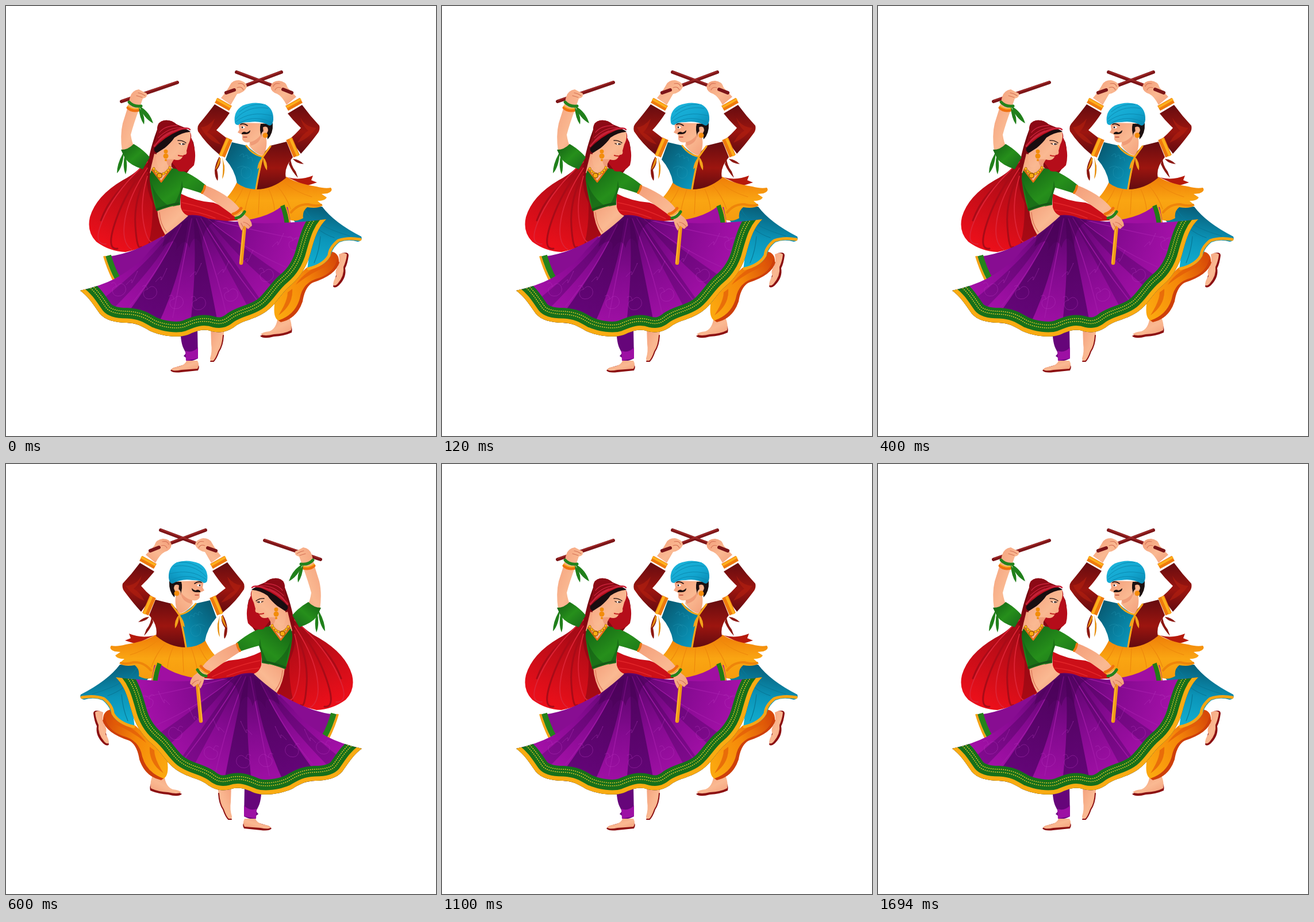
These frames come from a looping animation (748 by 748 pixels, 2.09 s). An HTML page:

```html
<!DOCTYPE html>
<html lang="en">
<head>
<meta charset="utf-8">
<title>Stick dance</title>
<style>
  html, body { margin: 0; width: 100%; height: 100%; overflow: hidden; background: #fff; }
  svg { display: block; width: 100vw; height: 100vh; }
  .line { fill: none; stroke-linecap: round; stroke-linejoin: round; }
  .skin { fill: url(#skin); }
  .stick { stroke: #7c1518; stroke-width: 6; }
  .shine { stroke: #a52a28; stroke-width: 1.5; }
  .sole { fill: #8c1012; }
  .motif { fill: none; stroke: #b73abd; stroke-width: 1; opacity: .4; }
</style>
</head>
<body>
<svg viewBox="0 0 748 748" xmlns="http://www.w3.org/2000/svg">
  <defs>
    <linearGradient id="skin" x1="0" y1="0" x2="1" y2="1">
      <stop offset="0" stop-color="#f39d79"/><stop offset=".55" stop-color="#fab992"/><stop offset="1" stop-color="#f3a07a"/>
    </linearGradient>
    <linearGradient id="maroon" x1="0" y1="0" x2="0" y2="1">
      <stop offset="0" stop-color="#650c10"/><stop offset=".55" stop-color="#9c150f"/><stop offset="1" stop-color="#620b10"/>
    </linearGradient>
    <linearGradient id="teal" x1="0" y1="0" x2="1" y2="1">
      <stop offset="0" stop-color="#075269"/><stop offset=".5" stop-color="#087a99"/><stop offset="1" stop-color="#0aa0c6"/>
    </linearGradient>
    <linearGradient id="dhoti" x1=".6" y1="0" x2=".4" y2="1">
      <stop offset="0" stop-color="#075a74"/><stop offset=".5" stop-color="#0b94b8"/><stop offset="1" stop-color="#12b0d2"/>
    </linearGradient>
    <linearGradient id="turban" x1="0" y1="0" x2="1" y2="1">
      <stop offset="0" stop-color="#1cb6dc"/><stop offset=".6" stop-color="#13a6d0"/><stop offset="1" stop-color="#0889b2"/>
    </linearGradient>
    <linearGradient id="amber" x1="0" y1="0" x2="0" y2="1">
      <stop offset="0" stop-color="#ef7d08"/><stop offset=".5" stop-color="#faa512"/><stop offset="1" stop-color="#f59a0e"/>
    </linearGradient>
    <linearGradient id="pants" x1="0" y1=".7" x2="1" y2=".2">
      <stop offset="0" stop-color="#fba70f"/><stop offset=".5" stop-color="#f58809"/><stop offset="1" stop-color="#d74908"/>
    </linearGradient>
    <linearGradient id="green" x1="0" y1="0" x2="1" y2="1">
      <stop offset="0" stop-color="#125f14"/><stop offset=".5" stop-color="#268f1b"/><stop offset="1" stop-color="#17661a"/>
    </linearGradient>
    <linearGradient id="cape" gradientUnits="userSpaceOnUse" x1="262" y1="245" x2="185" y2="415">
      <stop offset="0" stop-color="#770711"/><stop offset=".45" stop-color="#b80c17"/><stop offset="1" stop-color="#ea0f1a"/>
    </linearGradient>
    <radialGradient id="purple" gradientUnits="userSpaceOnUse" cx="318" cy="370" r="225">
      <stop offset="0" stop-color="#560467"/><stop offset=".45" stop-color="#840a90"/><stop offset="1" stop-color="#ac12ae"/>
    </radialGradient>
    <radialGradient id="fold" gradientUnits="userSpaceOnUse" cx="318" cy="370" r="200">
      <stop offset="0" stop-color="#4c035b"/><stop offset="1" stop-color="#66057a"/>
    </radialGradient>
    <path id="hem" d="M557 371C540 388 536 408 530 428C524 452 512 472 494 487C478 500 468 522 450 533C430 546 415 546 400 556C385 568 372 569 358 566C342 560 330 566 316 572C298 578 270 574 250 565C235 556 228 552 210 551C190 551 172 546 163 535C152 520 146 508 129 495"/>
    <clipPath id="inSkirt"><path id="skirtShape"/></clipPath>
    <path id="paisley" class="motif" d="M-13 -9Q-6 -15 -4 -4Q4 -14 11 -5Q16 6 4 12Q-9 15 -11 4Q-12 -3 -4 -4"/>
    <path id="squiggle" class="motif" d="M-10 10Q2 -4 0 4T5 -3T9 -12"/>
    <g id="cuff">
      <path class="line" style="stroke-linecap:butt" d="M-12.5 -7L12.5 7" stroke="#ef7a0e" stroke-width="10"/>
      <path class="line" style="stroke-linecap:butt" d="M-12 -9L13 5" stroke="#fcb01c" stroke-width="4"/>
    </g>
  </defs>
  <rect width="748" height="748" fill="#fff"/>
  <g id="dancers">
    <g id="man">
      <!-- feet and trousers -->
      <path class="sole" d="M584 430Q596 427 596 434Q594 449 590 456Q593 472 579 486Q572 492 569 488Z"/>
      <path class="skin" d="M579 432Q588 427 593 432Q592 443 587 454Q589 469 577 483Q571 489 569 484Q570 476 575 470Q572 463 575 457Q582 447 579 432Z"/>
      <path class="sole" d="M494 553Q499 560 497 568Q484 574 466 575Q448 580 442 574L450 570Z"/>
      <path class="skin" d="M472 546L494 544Q498 556 496 564Q485 570 466 571Q450 575 443 571Q447 567 458 566Q469 562 472 546Z"/>
      <path fill="url(#pants)" d="M465 510L522 456L566 427Q580 430 579 446Q572 468 532 480Q519 488 515 514Q505 543 478 549Q464 546 467 520Z"/>
      <path fill="#ce3f0a" d="M576 440Q572 463 545 473Q516 480 511 509Q503 537 474 547L478 550Q506 544 516 514Q520 488 534 481Q574 468 580 446Z"/>
      <path fill="#e35a08" opacity=".7" d="M560 452Q530 464 504 485Q521 458 563 445ZM498 492Q500 520 474 538Q490 513 490 498Z"/>
      <!-- draped cloth -->
      <path fill="url(#dhoti)" d="M490 360L522 350L550 349Q571 377 618 401Q621 408 612 410Q595 405 580 411Q570 419 566 430Q560 452 524 459L530 410Z"/>
      <path class="line" stroke="#f9a514" stroke-width="5" d="M616 406Q595 402 578 408Q563 420 562 434Q552 451 526 457"/>
      <path class="line" stroke="#087897" stroke-width="1.2" d="M521 355Q535 382 598 400M519 362Q540 393 571 403M547 401Q545 426 536 447"/>
      <!-- flared tunic -->
      <path fill="#b51a0c" d="M490 298Q512 304 534 295L531 303L541 307L522 313Z"/>
      <path fill="url(#amber)" d="M402 306Q444 324 488 297Q506 309 540 314Q555 318 565 316Q570 322 559 326L549 327L558 333Q555 339 542 339L551 347Q542 353 524 350Q515 357 517 369Q505 376 493 372L440 380Q403 368 371 344Q389 333 402 306Z"/>
      <path class="line" stroke="#ee890c" stroke-width="1.2" d="M413 315Q403 338 393 347M426 319Q418 341 415 360M441 320L439 362M457 318Q466 338 467 354M471 312Q487 330 495 353M482 305Q502 323 532 332"/>
      <path class="line" stroke="#ee850a" stroke-width="4" d="M496 359Q508 344 526 345Q541 349 548 346"/>
      <!-- torso -->
      <path fill="url(#teal)" d="M393 237L419 243Q435 258 447 262L435 319Q414 318 402 308Q398 285 382 267Z"/>
      <path fill="url(#maroon)" d="M446 258L460 243L488 236L499 263Q483 281 487 299Q463 319 435 319L447 262Z"/>
      <g class="motif" style="stroke:#2a9cb7"><path d="M406 261q9-9 7 2q9-9 8 3q8-8 8 4M410 295q-4-16 9-15q12 4 6 16q-8 8-15-1M402 282q12-8 17 2"/></g>
      <!-- head -->
      <path class="skin" d="M404 203L406 215L403 220L411 224L411 232Q414 239 424 237L423 243Q434 258 447 260Q455 249 453 231L449 204Z"/>
      <path fill="#e88968" opacity=".6" d="M424 237Q437 234 444 223Q443 239 426 243Z"/>
      <path fill="#1d1010" d="M443 205L464 204Q465 222 455 232Q454 220 449 217Q442 220 445 229Q440 215 443 205Z"/>
      <path class="skin" d="M447 211Q455 207 456 216Q454 225 448 222Z"/>
      <circle cx="451" cy="225" r="4.5" fill="#f68c0b"/>
      <path class="line" stroke="#251111" stroke-width="1.6" d="M408 206Q413 203 420 208"/>
      <ellipse cx="412" cy="211" rx="3.5" ry="2" fill="#fff"/><circle cx="411" cy="211" r="1.5" fill="#211"/>
      <path fill="#1d1010" d="M410 221Q414 217 418 220Q422 219 425 216Q425 223 417 223L410 223Z"/>
      <path class="line" stroke="#bd4837" stroke-width="1.5" d="M413 228L419 228"/>
      <path fill="url(#turban)" d="M398 203Q395 183 412 173Q432 165 451 171Q466 179 465 198Q464 208 458 208Q443 199 424 202Q409 202 404 207Q399 207 398 203Z"/>
      <path class="line" stroke="#0c8bb2" stroke-width="1" d="M400 196Q422 172 456 178M400 201Q426 181 463 191M407 203Q433 188 463 203M406 184Q424 169 447 171"/>
      <!-- trim and tie -->
      <path class="line" stroke="#f8a51a" stroke-width="3" d="M418 243Q429 259 447 262L460 244M446 264Q440 287 435 318"/>
      <path fill="#f4a31b" d="M447 262Q456 272 454 286Q447 278 447 262ZM446 263Q446 279 437 284Q438 272 446 263Z"/>
      <!-- sticks and arms -->
      <path class="line stick" d="M401 115L497 151M479 115L383 151"/>
      <path class="line shine" d="M402 114L497 149M478 114L416 137"/>
      <path class="skin" d="M390 137Q394 129 405 129Q419 132 419 141Q414 151 402 153L391 172L374 160Q384 148 390 137Z"/>
      <path class="skin" d="M460 140Q463 130 475 130Q487 131 490 142L505 158L488 172Q480 157 472 153Q461 150 460 140Z"/>
      <path class="line" stroke="#d8775a" stroke-width="1.2" d="M404 135Q413 133 415 140M402 142Q410 139 413 146M476 135Q467 133 465 140M478 142Q471 140 468 146"/>
      <path class="line stick" d="M482 145L497 151M397 146L383 151"/>
      <path fill="url(#maroon)" d="M363 171L389 186Q378 203 366 216L388 233L372 259Q350 242 334 218Q332 210 336 205Q351 187 363 171Z"/>
      <path fill="url(#maroon)" d="M490 187L515 172Q529 191 545 208Q547 216 541 223Q526 243 513 257L494 231Q505 222 513 212Q500 200 490 187Z"/>
      <path fill="#b52010" opacity=".6" d="M339 211Q352 210 363 196Q359 211 350 220Q361 225 374 241Q352 236 339 211ZM540 212Q521 211 512 194Q515 208 526 217Q515 223 507 238Q526 231 540 212Z"/>
      <use href="#cuff" transform="translate(378 171)"/>
      <use href="#cuff" transform="matrix(-1 0 0 1 501 171)"/>
      <use href="#cuff" transform="translate(382 246) rotate(-96) scale(1.15)"/>
      <use href="#cuff" transform="matrix(-1 0 0 1 499 246) rotate(-96) scale(1.15)"/>
      <path fill="#8c1710" d="M371 262Q377 271 367 285Q370 299 368 304Q363 298 363 286Q364 274 371 262ZM495 263Q495 277 504 288L508 299Q498 289 492 275ZM499 266Q509 266 518 275Q505 274 499 266Z"/>
      <path fill="#e7900e" d="M376 263Q379 280 376 301Q381 293 380 278ZM371 264L364 285Q371 279 374 265Z"/>
    </g>
    <g id="woman">
      <!-- rear fabric -->
      <path fill="#cc0f18" d="M303 326Q330 340 361 342Q389 352 404 373L350 376L304 365Z"/>
      <path class="line" stroke="#e3262a" stroke-width="1.5" d="M306 342Q344 349 389 370M308 355Q335 357 364 369"/>
      <path fill="#a00fa2" d="M390 376Q453 371 480 348L490 350L496 381Q440 387 390 382Z"/>
      <path class="line" stroke="#217b16" stroke-width="8" style="stroke-linecap:butt" d="M481 347Q487 362 489 381"/>
      <path class="line" stroke="#f4a315" stroke-width="2" style="stroke-linecap:butt" d="M486 347Q492 362 494 381"/>
      <path fill="url(#cape)" d="M264 212Q254 238 249 262Q234 287 203 303Q157 330 146 367Q140 393 157 410Q180 427 208 428Q250 419 284 394L265 356L252 301L282 270Q292 293 315 290Q334 268 326 237L313 212Z"/>
      <path fill="#7b0711" opacity=".5" d="M249 265Q238 307 255 343Q256 382 248 413L276 398L262 354L251 302L259 280Z"/>
      <path class="line" stroke="#a90b17" stroke-width="3" d="M237 286Q183 323 165 373M246 290Q222 337 225 382T235 419M243 281Q209 321 191 373T194 422"/>
      <path class="line" stroke="#dd2335" stroke-width="1.8" d="M246 271Q194 317 171 366T174 414M246 282Q214 330 207 371T219 424M246 296Q233 341 239 376T255 411"/>
      <!-- legs -->
      <path class="skin" d="M356 556L380 556Q378 590 370 600Q366 612 361 618Q355 620 355 613Q359 601 357 588Z"/>
      <path class="line" stroke="#8c1012" stroke-width="2" d="M378 573Q377 591 370 601Q366 613 361 618L356 618"/>
      <path fill="url(#fold)" d="M303 560L333 560L334 613Q323 619 313 617L315 613L309 609L313 604L309 596Q304 587 303 560Z"/>
      <path fill="#9d10a4" d="M312 600Q325 604 334 594L334 613L313 617Z"/>
      <path class="sole" d="M330 618Q339 627 334 634L305 637Q290 639 286 634L290 630Z"/>
      <path class="skin" d="M314 617L333 617Q337 624 333 631L305 633Q291 636 287 632Q291 628 301 627Q312 624 314 617Z"/>
      <!-- skirt -->
      <path fill="#880d92" d="M172 436Q215 434 272 400L290 470L192 480Z"/>
      <path class="line" stroke="#24831b" stroke-width="10" style="stroke-linecap:butt" d="M178 434Q184 456 194 474"/>
      <path class="line" stroke="#f4a315" stroke-width="4" style="stroke-linecap:butt" d="M171 435Q177 456 187 476"/>
      <g clip-path="url(#inSkirt)">
        <path fill="url(#purple)" d="M120 350H570V590H120Z"/>
        <path fill="url(#fold)" d="M306 376Q282 440 200 550L262 560Q307 465 317 372ZM326 370Q333 450 320 560L370 560Q350 454 331 369Z"/>
        <path fill="url(#fold)" opacity=".55" d="M336 368Q376 439 432 545L456 530Q385 428 342 367ZM350 369Q398 434 478 500L496 478Q407 420 354 369ZM284 396Q246 450 155 520L178 535Q266 449 296 386Z"/>
        <path class="line" stroke="#a31ba9" stroke-width="1.6" opacity=".8" d="M323 370Q306 459 290 542M331 370Q363 447 383 535M339 369Q387 449 441 517M352 371Q407 419 486 454M305 380Q264 465 215 522M364 373Q431 391 516 407"/>
        <path fill="#4a0359" opacity=".5" d="M277 398L317 364L372 373Q342 377 341 419Q328 389 319 421Q312 398 296 425Q301 397 272 419Z"/>
        <use href="#paisley" x="453" y="467"/><use href="#paisley" x="503" y="412"/><use href="#paisley" x="391" y="501"/>
        <use href="#paisley" x="335" y="516"/><use href="#paisley" x="296" y="514"/><use href="#paisley" x="250" y="497"/><use href="#paisley" x="196" y="492"/>
        <use href="#squiggle" x="330" y="461"/><use href="#squiggle" x="378" y="457"/><use href="#squiggle" x="420" y="438"/>
        <use href="#squiggle" x="473" y="409"/><use href="#squiggle" x="270" y="470"/><use href="#squiggle" x="219" y="475"/>
        <use href="#hem" fill="none" stroke="#17701a" stroke-width="52"/>
        <use href="#hem" fill="none" stroke="#f9ab12" stroke-width="15"/>
        <g id="stitches" class="line" stroke="#e0c52b" stroke-width="1.8" stroke-dasharray=".2 3.4"></g>
      </g>
      <!-- raised arm -->
      <path class="line stick" d="M201 166L298 133"/><path class="line shine" d="M202 164L298 131"/>
      <path class="skin" d="M216 158Q219 147 231 145Q238 149 245 152Q247 159 238 161L232 178Q222 205 217 224Q219 238 224 247L202 253Q198 225 203 204Q211 181 216 158Z"/>
      <path class="line" stroke="#d57457" stroke-width="1.2" d="M230 151Q236 152 242 156M227 156L237 159"/>
      <path class="line" stroke="#ef7110" stroke-width="5" d="M212 177Q219 184 231 181"/>
      <path class="line" stroke="#f8b11e" stroke-width="2" d="M212 174Q221 181 232 178"/>
      <path class="line" stroke="#22831c" stroke-width="5" d="M214 167Q222 176 235 174"/>
      <path fill="#20801b" d="M232 174Q250 184 256 204Q239 195 232 174ZM231 176Q243 190 240 206Q232 195 231 176ZM205 255Q203 281 193 291Q193 275 203 257ZM207 257Q213 278 208 293Q202 279 207 257Z"/>
      <path fill="url(#green)" d="M200 250Q213 250 222 240Q238 249 250 263L238 284Q216 277 207 265Z"/>
      <!-- body -->
      <path class="skin" d="M258 257L287 265L288 286L269 307L250 290Z"/>
      <path class="skin" d="M263 354L303 343Q304 360 317 365Q299 382 277 398Q265 379 263 354Z"/>
      <path class="line" stroke="#df795c" stroke-width="1.4" d="M267 359Q268 379 279 393"/>
      <path fill="url(#green)" d="M250 303Q249 291 255 283L270 307L287 282Q314 284 348 312L341 326Q320 319 308 316Q302 331 303 346Q280 349 262 357Q253 330 250 303Z"/>
      <path fill="#115415" opacity=".5" d="M308 316Q302 332 303 346L290 349Q304 328 306 304ZM252 305Q260 332 285 349L262 357Z"/>
      <path class="line" stroke="#e86b11" stroke-width="2.5" d="M254 285L270 306L287 283"/>
      <path class="line" stroke="#165717" stroke-width="3" d="M262 354Q282 346 301 343"/>
      <!-- lowered arm -->
      <path class="line" stroke="#f19a16" stroke-width="6.5" d="M415 382L409 447"/>
      <path class="line" stroke="#ffc03a" stroke-width="1.5" d="M413 389L407 447"/>
      <path class="skin" d="M347 312Q383 326 402 347L416 364Q427 371 428 382L421 388L414 382L410 391Q403 380 403 370Q373 347 340 326Z"/>
      <path class="line" stroke="#d57457" stroke-width="1.2" d="M413 376Q420 377 425 384M409 378L414 387"/>
      <path class="line" stroke="#ed7610" stroke-width="4" d="M346 313Q345 320 341 325"/>
      <path class="line" stroke="#ef7110" stroke-width="5" d="M395 362Q403 360 409 352"/>
      <path class="line" stroke="#22831c" stroke-width="5" d="M400 369Q409 368 415 358"/>
      <path class="line" stroke="#f8b11e" stroke-width="1.8" d="M397 365Q406 363 412 354"/>
      <!-- veil and face -->
      <path fill="#b50d1a" d="M256 243Q265 228 263 213Q264 201 275 199Q287 197 297 206L311 213Q324 218 322 229Q333 255 327 277Q315 291 300 287L288 271Z"/>
      <path fill="#8c0915" d="M258 241Q266 227 263 213Q264 201 275 199Q287 197 297 206L312 212Q289 216 274 229Q263 240 258 254Z"/>
      <path class="line" stroke="#c9223a" stroke-width="1.3" d="M267 220Q276 208 298 208M265 229Q284 210 306 212M261 240Q271 224 290 217"/>
      <path fill="#180d10" d="M258 247Q277 227 299 218Q314 211 321 219Q303 223 292 232Q283 250 264 256Q256 254 258 247Z"/>
      <path class="skin" d="M276 247Q287 238 293 229Q306 220 320 219Q323 230 317 241L314 252Q316 259 309 259L306 264Q302 270 292 267Q285 277 286 284L265 280Q259 266 262 256Z"/>
      <path fill="#e98a68" opacity=".6" d="M278 267Q286 266 292 267Q285 277 285 283Q280 275 278 267Z"/>
      <path class="line" stroke="#251111" stroke-width="1.4" d="M299 234Q306 233 313 238M301 239Q306 242 311 240"/>
      <ellipse cx="307" cy="240" rx="3" ry="1.6" fill="#fff"/><circle cx="308" cy="240" r="1.5" fill="#211"/>
      <path class="line" stroke="#c72724" stroke-width="2.2" d="M300 260Q303 261 307 261"/>
      <path class="line" stroke="#c9223a" stroke-width="2.5" d="M258 244Q274 223 300 215Q316 210 320 215"/>
      <g fill="#f28c0b"><circle cx="278" cy="253" r="3.5"/><circle cx="278" cy="261" r="4.5"/><circle cx="278" cy="268" r="2"/></g>
      <path class="line" stroke="#995007" stroke-width="5" stroke-dasharray=".2 5" d="M257 283Q263 292 270 293Q280 291 285 281"/>
      <path class="line" stroke="#ffb713" stroke-width="4" stroke-dasharray=".2 5" d="M257 283Q263 292 270 293Q280 291 285 281"/>
      <circle cx="267" cy="295" r="5" fill="#9d5506"/><circle cx="267" cy="295" r="3.6" fill="#f9ac12"/>
    </g>
  </g>
</svg>
<script>
  const LOOP = 2090;
  const mirrored = [[200, 400], [600, 1100]];
  const byId = id => document.getElementById(id);
  const hem = byId('hem');
  const dancers = byId('dancers');

  // A line that runs parallel to the hem, a given distance inside it.
  function insetHem(distance) {
    const points = [];
    for (let s = 0; s < hem.getTotalLength() - 1; s += 5) {
      const p = hem.getPointAtLength(s);
      const q = hem.getPointAtLength(s + 1);
      const reach = distance / Math.hypot(q.x - p.x, q.y - p.y);
      const x = p.x - (q.y - p.y) * reach;
      const y = p.y + (q.x - p.x) * reach;
      points.push(`${x.toFixed(1)} ${y.toFixed(1)}`);
    }
    return `<path d="M${points.join('L')}"/>`;
  }

  byId('skirtShape').setAttribute('d', hem.getAttribute('d') +
    'Q165 487 190 474Q230 452 250 425L277 398L317 364Q335 362 352 370Q400 377 450 378Q510 377 557 371Z');
  byId('stitches').innerHTML = insetHem(15) + insetHem(20);

  const start = performance.now();

  function draw(now) {
    const t = Math.max(0, now - start) % LOOP;
    const flip = mirrored.some(([from, to]) => t >= from && t < to);
    dancers.setAttribute('transform', flip ? 'matrix(-1 0 0 1 748 0)' : 'matrix(1 0 0 1 0 0)');
    requestAnimationFrame(draw);
  }
  draw(start);
</script>
</body>
</html>
```
